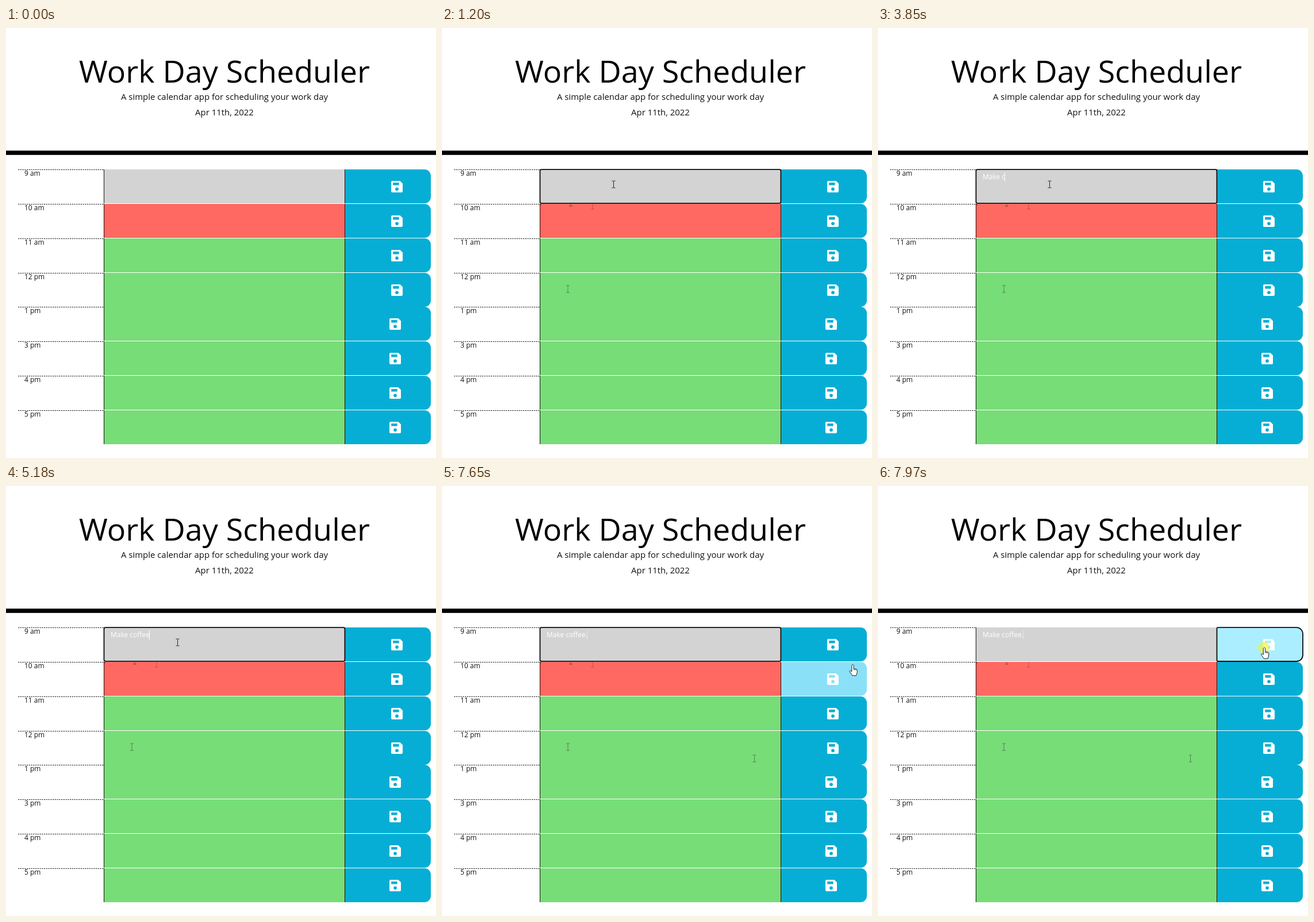
An HTML page that plays this animation: 748 by 748 pixels, repeating every 8 s.

```html
<!DOCTYPE html>
<html lang="en">
<head>
<meta charset="utf-8">
<title>Work Day Scheduler</title>
<style>
  html, body { margin: 0; width: 100%; height: 100%; overflow: hidden; background: #fff; }
  svg { display: block; width: 100vw; height: 100vh; }
  text { font-family: "Open Sans", "Noto Sans", sans-serif; font-size: 11.96px; fill: #111; white-space: pre; }
  .head { text-anchor: middle; font-size: 14.95px; }
  .title { font-size: 53.82px; fill: #000; }
  .focus { fill: none; stroke: #0c0c0c; stroke-width: 1.8; }
</style>
</head>
<body>
<svg id="stage" viewBox="0 0 748 748">
  <defs>
    <path id="save" fill="#fff" fill-rule="evenodd" d="M-8-10H5.4L10-5.4V8a2 2 0 0 1-2 2H-8a2 2 0 0 1-2-2V-8a2 2 0 0 1 2-2zM-6.8-7V-2.6H3.6V-7zM0 1.3a3 3 0 1 0 .01 0z"/>
    <path id="beam" fill="none" stroke="#222" d="M-3-6h2.4L0-5.5.6-6H3M-3 6h2.4L0 5.5.6 6H3M0-5.5v11"/>
    <path id="arrow" fill="#fff" stroke="#111" stroke-width=".9" d="M0 0V12l2.8-2.6 1.8 4.2 1.8-.8-1.8-4.1h3.8z"/>
    <g id="hand" stroke="#111" stroke-width=".95" stroke-linejoin="round">
      <path fill="#fff" d="M0 0c1.2 0 1.7.9 1.7 1.9v5l4.6 1.1c1.1.3 1.7 1 1.6 2.3l-.5 4.4-1.4 4.3H-.8l-1.2-2-3.4-4.8c-.6-1 .5-2.2 1.6-1.6l2.1 1.5V1.9C-1.7.9-1.2 0 0 0z"/>
      <path fill="none" stroke-width=".7" d="M1.7 7v2.6M3.9 7.6v2.2M6 8.2v2"/>
    </g>
  </defs>
  <rect width="748" height="748" fill="#fff"/>
  <text class="head title" x="380" y="95">Work Day Scheduler</text>
  <text class="head" x="380" y="125.3">A simple calendar app for scheduling your work day</text>
  <text class="head" x="380" y="152">Apr 11th, 2022</text>
  <rect y="213.3" width="748" height="7.5"/>
  <g id="rows"></g>
  <g id="trails"></g>
  <text id="typed" x="182" y="263" style="fill:#fff"></text>
  <rect id="caret" y="251" width="1" height="16" fill="#fff"/>
  <rect id="fieldFocus" class="focus" x="170.5" y="246.2" width="418.9" height="58.6" rx="2.5"/>
  <path id="buttonFocus" class="focus" d="M591.5 246.2H728a11 11 0 0 1 11 11V294a11 11 0 0 1-11 11H591.5a2 2 0 0 1-2-2V248.2a2 2 0 0 1 2-2z"/>
  <circle id="click" r="10" fill="#f2f230" opacity=".62"/>
  <use id="cursor"/>
</svg>
<script>
const LOOP = 8000;
const $ = id => document.getElementById(id);

function add(parent, tag, attrs, text) {
  const el = document.createElementNS('http://www.w3.org/2000/svg', tag);
  for (const k in attrs) el.setAttribute(k, attrs[k]);
  if (text) el.textContent = text;
  parent.appendChild(el);
  return el;
}

const hours = ['9 am', '10 am', '11 am', '12 pm', '1 pm', '3 pm', '4 pm', '5 pm'];
const buttons = hours.map((hour, i) => {
  const y = Math.round(246.2 + 59.8 * i), g = $('rows');
  const fill = ['#d3d3d3', '#ff6961'][i] || '#77dd77';
  add(g, 'path', { d: `M21 ${y + .5}H171`, stroke: '#111', 'stroke-dasharray': '2.25 1.5' });
  add(g, 'text', { x: 32, y: y + 11 }, hour);
  add(g, 'rect', { x: 171, y, width: 419, height: 59, fill });
  const button = add(g, 'path', { d: `M590 ${y}H728a11 11 0 0 1 11 11v37a11 11 0 0 1-11 11H590z` });
  add(g, 'path', { d: `M170.5 ${y}v59M589.5 ${y}v59`, stroke: '#111' });
  add(g, 'use', { href: '#save', x: i < 4 ? 680 : 677, y: y + 30 });
  return button;
});

// Faint marks the pointer leaves behind, each from its own time on.
const trails = [
  [570, 'M216-6', 219, 454, .45],
  [650, '', 224, 304, .5],
  [650, '', 262, 309, .28],
  [7510, '', 543.5, 474, .45]
].map(([from, , x, y, opacity]) => {
  const attrs = { fill: 'none', stroke: '#222', opacity, transform: `translate(${x} ${y})` };
  const top = y < 320 ? 306 - y : -5.5;
  const serif = y < 320 ? '' : 'M-3-6H3';
  return { from, el: add($('trails'), 'path', { ...attrs, d: `${serif}M0 ${top}V6M-3 6H3` }) };
});
trails.push({ from: 650, el: add($('trails'), 'rect', { x: 171, y: 306, width: 2, height: 2, opacity: .45 }) });

// time, pointer, x, y, hovered row, hover strength
const moves = [
  [0, ''],
  [70, 'arrow', 634, 721],
  [140, 'beam', 520, 690],
  [210, 'beam', 330, 640],
  [290, 'arrow', 150, 585],
  [360, 'arrow', 98, 520],
  [500, 'beam', 219, 454],
  [570, 'beam', 262, 309],
  [610, 'beam', 224, 304],
  [650, 'beam', 298.5, 272],
  [7300, 'beam', 372, 335],
  [7370, 'beam', 470, 425],
  [7440, 'beam', 543.5, 474],
  [7510, 'hand', 640, 412, 2, .2],
  [7580, 'hand', 708, 338, 1, .2],
  [7650, 'hand', 714.5, 310.8, 1, .8],
  [7720, 'hand', 711, 307, 1, 1],
  [7770, 'hand', 702.5, 303.8, 1, 1],
  [7840, 'hand', 688, 292, 0, .3],
  [7900, 'hand', 673, 281.3, 0, .8],
  [7970, 'hand', 672, 281.3, 0, 1]
];

const message = 'Make coffee.';
const keys = [2920, 3060, 3190, 3320, 3460, 3850, 4250, 4380, 4580, 4980, 5180, 7100];
const BLINK = 530, FOCUS = 650, BLUR = 7970;

const show = (el, on) => el.setAttribute('visibility', on ? 'visible' : 'hidden');
const mix = k => `rgb(${6 + 165 * k},${174 + 64 * k},${213 + 42 * k})`;

function caretOpacity(t, count) {
  if (t < FOCUS) return 0;
  if (count === message.length) return .4;
  const since = count ? keys[count - 1] : 670;
  return Math.floor((t - since) / BLINK) % 2 ? 0 : 1;
}

function render(t) {
  const [, shape, x, y, row, strength] = moves.filter(m => m[0] <= t).pop();
  const cursor = $('cursor');
  show(cursor, shape);
  if (shape) {
    cursor.setAttribute('href', '#' + shape);
    cursor.setAttribute('transform', `translate(${x} ${y})`);
  }
  buttons.forEach((b, i) => b.setAttribute('fill', mix(i === row ? strength : 0)));
  trails.forEach(m => show(m.el, t >= m.from));

  const count = keys.filter(k => k <= t).length;
  const typed = $('typed');
  typed.textContent = message.slice(0, count);
  const width = count ? typed.getComputedTextLength() : 0;
  $('caret').setAttribute('x', Math.floor(182 + Math.max(0, width - .1)));
  $('caret').setAttribute('opacity', caretOpacity(t, count));

  show($('fieldFocus'), t >= FOCUS && t < BLUR);
  show($('buttonFocus'), t >= BLUR);
  const click = $('click');
  show(click, (t >= FOCUS && t < 800) || t >= BLUR);
  click.setAttribute('cx', t >= BLUR ? 670.5 : 298.5);
  click.setAttribute('cy', t >= BLUR ? 281 : 272);
}

const start = performance.now();
function tick() {
  render((performance.now() - start) % LOOP);
  requestAnimationFrame(tick);
}
tick();
</script>
</body>
</html>
```
